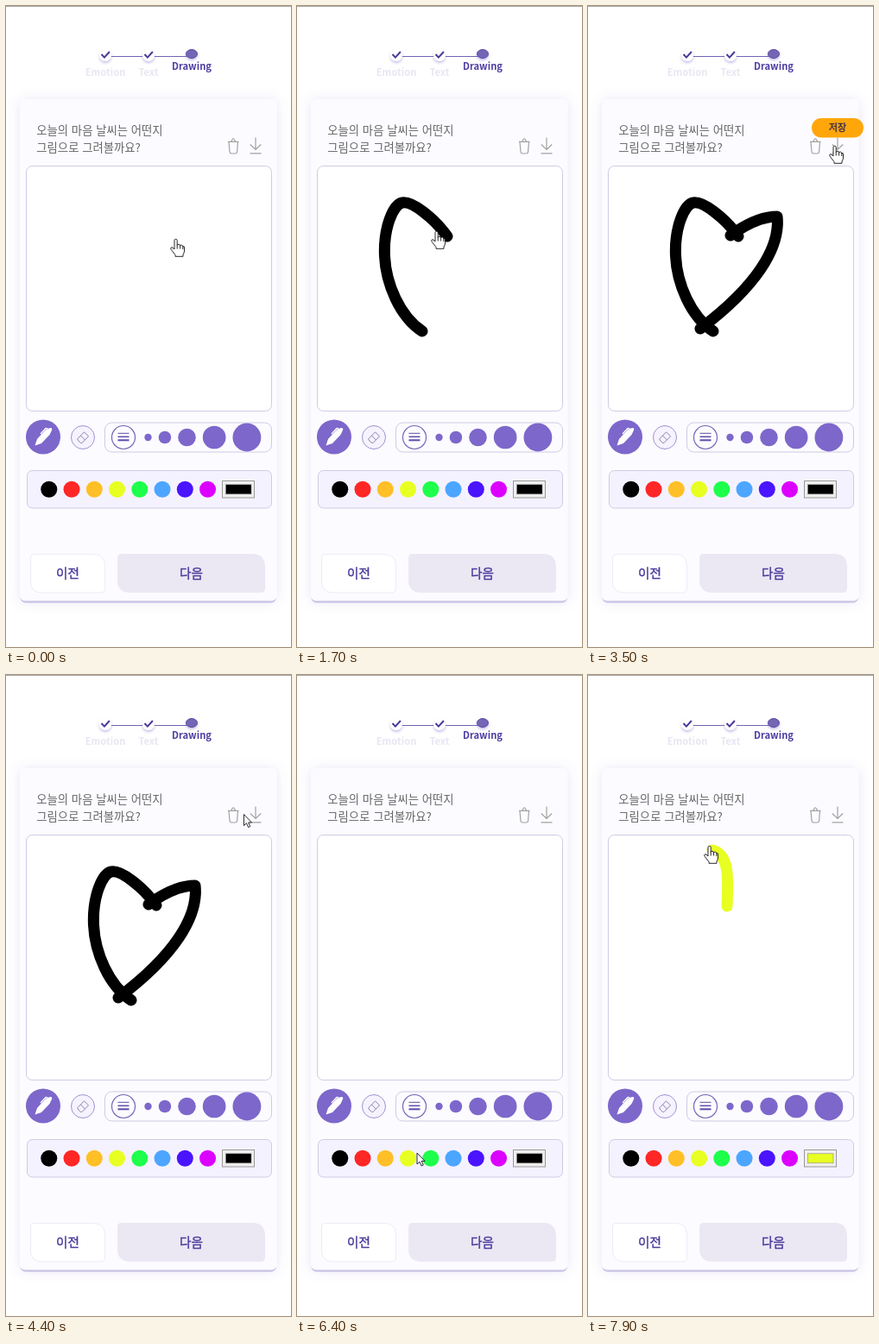
Write an HTML page that moves like this. It is 330x743 px and loops after 8000 ms.

```html
<!DOCTYPE html>
<html lang="ko">
<head>
<meta charset="utf-8">
<title>Drawing</title>
<style>
  html, body { margin: 0; width: 100%; height: 100%; overflow: hidden; background: #fff; }
  svg { display: block; width: 100vw; height: 100vh; }
  text { font-family: "Noto Sans CJK KR", "Noto Sans CJK JP", "Noto Sans CJK", "Noto Sans", sans-serif; }
  .step { font-size: 11.2px; font-weight: 700; text-anchor: middle; fill: #e9e6f3; }
  .ask { font-size: 13.35px; fill: #666; }
  .btn { font-size: 14.6px; text-anchor: middle; fill: #4c3b9b; stroke: #4c3b9b; stroke-width: .4; }
  .tip rect { fill: #ffa60a; }
  .tip text { font-size: 11px; text-anchor: middle; fill: #35264f; stroke: #35264f; stroke-width: .3; }
  .box { stroke: #cfcbe3; fill: #fcfbff; }
  .icon { fill: none; stroke: #a2a2a2; stroke-width: 1.2; }
  .ink { fill: none; stroke-width: 13; stroke-linecap: round; stroke-linejoin: round; }
  .cursor { fill: #fff; stroke: #111; stroke-width: .9; stroke-linejoin: round; }
</style>
</head>
<body>
<svg viewBox="0 0 330 743">
  <defs>
    <filter id="glow" x="-20%" y="-20%" width="140%" height="140%">
      <feDropShadow dx="0" dy="1" stdDeviation="7" flood-color="#7460c8" flood-opacity=".17"/>
    </filter>
    <filter id="soft" x="-60%" y="-60%" width="220%" height="220%">
      <feDropShadow dx="0" dy="2" stdDeviation="1.7" flood-color="#7460c8" flood-opacity=".4"/>
    </filter>
  </defs>
  <rect width="330" height="743" fill="#fff"/>
  <rect width="330" height="1" fill="#a9a9a9"/>

  <path d="M115 58.5H215" stroke="#7263b5" stroke-width="1.2"/>
  <g filter="url(#soft)" fill="#fff">
    <circle cx="115" cy="57" r="7"/>
    <circle cx="165" cy="57" r="7"/>
    <ellipse cx="215" cy="55.5" rx="6.5" ry="5" fill="#7566b5" stroke="#5747a0"/>
  </g>
  <path d="M110.500 56l3.400 3.600 6-6.600M160.500 56l3.400 3.600 6-6.600" fill="none" stroke="#4b3798" stroke-width="2"/>
  <text class="step" x="115" y="81">Emotion</text>
  <text class="step" x="165" y="81">Text</text>
  <text class="step" x="215" y="73.700" style="fill:#4f3da3">Drawing</text>

  <rect x="16.500" y="111" width="296.500" height="580.700" rx="6" fill="#cfcae6"/>
  <rect x="16" y="108" width="297.500" height="581.500" rx="6" fill="#fcfbff" filter="url(#glow)"/>
  <text class="ask" x="35.300" y="149.300">오늘의 마음 날씨는 어떤지</text>
  <text class="ask" x="35.300" y="168.800">그림으로 그려볼까요?</text>
  <path class="icon" d="M257 157.300H269.500M261 157Q263.200 150.500 265.500 157M258 157.500L259 169Q259.300 171 261 171H265.500Q267.300 171 267.600 169L268.500 157.500"/>
  <path class="icon" d="M289 152.500V166M282.800 160.500L289 166.500L295.200 160.500M282.500 170.800H295.500"/>

  <rect class="box" x="23.500" y="185.500" width="284" height="284" rx="7" style="fill:#fff"/>

  <circle cx="43" cy="499.500" r="20" fill="#7d67cb"/>
  <path d="M33.500 509.500L36 502L45.500 491.500L51 489Q54 488.500 53 491.800L50.500 497L41 507Z" fill="#fff"/>
  <path d="M40 496L46 489.500L48.500 490" fill="none" stroke="#fff" stroke-width="1.300"/>
  <circle cx="89" cy="500" r="13.500" fill="#f6f3ff" stroke="#a093d2"/>
  <path d="M83 501.500L90.500 493.800L95.500 498.800L88 506.500H86.500L83 503ZM86.500 498L91.500 503" fill="none" stroke="#8c82ac"/>
  <rect class="box" x="114.500" y="483" width="193" height="34" rx="8"/>
  <circle cx="136" cy="500" r="13.500" fill="#fcfbff" stroke="#7665b8" stroke-width="1.200"/>
  <g id="lines" stroke="#5e4ea8"></g>
  <rect class="box" x="24.500" y="538.500" width="283" height="43.500" rx="6" style="fill:#f5f2ff"/>
  <g id="dots"></g>
  <rect x="250.500" y="550.500" width="37" height="19.500" fill="#f0efee" stroke="#999"/>
  <rect id="swatch" x="254.500" y="554.800" width="29.500" height="11" stroke="#888" stroke-width=".6"/>

  <path d="M33 635.500H101Q114.500 635.500 114.500 649V675Q114.500 680 110 680H42Q28.500 680 28.500 667V640Q28.500 635.500 33 635.500Z" fill="#fff" stroke="#eeebf7"/>
  <path d="M134 635H285Q300 635 300 650V675Q300 680 295 680H144Q129 680 129 665V640Q129 635 134 635Z" fill="#ebe8f4"/>
  <text class="btn" x="71.500" y="663">이전</text>
  <text class="btn" x="214.500" y="663">다음</text>

  <g id="inks"></g>

  <g class="tip" id="saveTip">
    <rect x="259" y="130" width="60" height="22.500" rx="11.200"/>
    <text x="289" y="145.300">저장</text>
  </g>
  <g class="tip" id="resetTip">
    <rect x="233" y="130" width="60" height="22.500" rx="11.200"/>
    <text x="263.500" y="145.300">초기화</text>
  </g>

  <path class="cursor" id="arrow" d="M0 0V13L3 10.200L5.200 15L7.300 14L5.200 9.400H9Z"/>
  <path class="cursor" id="hand" d="M-1 12V1.700Q-1 .3 .6 .3T2.200 1.700V7.200Q2.400 6 4 6.200T5.600 8Q6 6.800 7.400 7.100T8.800 9Q10.500 7.500 10.500 10V14Q10.500 16 9 18V20.300H0V18.500L-4.700 12.500Q-6 10.600 -4.600 9.800T-1 12ZM2.200 7V11.500M5.600 8V11.500M8.800 9V12"/>
</svg>
<script>
const LOOP = 8000, STEP = 100;
const CLEAR = 5500, PICK = 6800;
const YELLOW = '#e8ff22';
const $ = id => document.getElementById(id);

function add(parent, tag, attrs) {
  const el = document.createElementNS('http://www.w3.org/2000/svg', tag);
  for (const key in attrs) el.setAttribute(key, attrs[key]);
  return parent.appendChild(el);
}

for (let i = 0; i < 3; i++) {
  add($('lines'), 'path', { d: `M129.500 ${495.3 + i * 4}h13`, 'stroke-width': 1 + i * .5 });
}

// Brush sizes grow evenly with equal gaps; colours share one size
const dots = [];
for (let i = 0, x = 164.5; i < 5; i++) {
  const r = 4.2 + i * 3.05;
  dots.push({ x, y: 500, r, fill: '#7d67cb' });
  x += 2 * r + 3.05 + 8;
}
['#000', '#ff2626', '#ffbf26', YELLOW, '#1eff4c', '#4ca6ff', '#4a14ff', '#dc00ff']
  .forEach((fill, i) => dots.push({ x: 49.8 + i * 26.25, y: 560.2, r: 9.5, fill }));
dots.forEach(d => add($('dots'), 'circle', { cx: d.x, cy: d.y, r: d.r, fill: d.fill }));

// The pointer rides a little up and left of the ink
const grip = p => ({ x: p.x - 4, y: p.y - 5 });

function stroke(start, end, color, d) {
  const el = add($('inks'), 'path', { class: 'ink', stroke: color, d });
  const len = el.getTotalLength();
  return { start, end, el, len, at: u => grip(el.getPointAtLength(len * u)) };
}

const strokes = [
  stroke(700, 1500, '#000', 'M174 267C158 245 133 226 122 228S100 258 101.500 290S119 360 145 377'),
  stroke(1700, 2300, '#000', 'M165 266C180 255 199 244 219 244C223 280 195 325 130 374'),
  stroke(7600, 7900, YELLOW, 'M161 268C162 240 165 208 144 203')
];
const [left, right, ray] = strokes;

// Each glide leaves from wherever the pointer last rested
const glide = (start, end, to) => ({ start, end, to });
const moves = [
  glide(0, 500, left.at(0)), left,
  glide(1500, 1700, right.at(0)), right,
  glide(2300, 2600, { x: 154, y: 363 }),
  glide(2600, 3100, { x: 279, y: 164 }),
  glide(3300, 3600, { x: 288, y: 161 }),
  glide(4200, 4550, { x: 266, y: 162 }),
  glide(CLEAR, 6300, { x: 139, y: 554 }),
  glide(6400, 6600, { x: 126, y: 557 }),
  glide(PICK, 7600, ray.at(0)), ray
];
let rest = { x: 196, y: 270 };
for (const m of moves) {
  if (m.to) {
    const from = rest;
    m.at = u => ({ x: from.x + (m.to.x - from.x) * u, y: from.y + (m.to.y - from.y) * u });
  }
  rest = m.at(1);
}

const progress = (m, t) => Math.max(0, Math.min(1, (t - m.start) / (m.end - m.start)));
const show = (el, on) => el.setAttribute('visibility', on ? 'visible' : 'hidden');

function draw(t) {
  for (const s of strokes) {
    const p = progress(s, t);
    show(s.el, p > 0 && (s === ray || t < CLEAR));
    s.el.setAttribute('stroke-dasharray', `${p * s.len + .1} ${s.len * 2}`);
  }
  const move = moves.filter(m => m.start <= t).pop();
  const { x, y } = move.at(progress(move, t));
  const inside = (l, top, r, b) => x >= l && x <= r && y >= top && y <= b;
  const save = inside(282, 150, 297, 173);
  const reset = inside(256, 150, 270, 173);
  const hand = save || reset || inside(24, 186, 307, 469) ||
    dots.some(d => Math.hypot(x - d.x, y - d.y) < d.r);
  show($('saveTip'), save);
  show($('resetTip'), reset);
  show($('hand'), hand);
  show($('arrow'), !hand);
  $(hand ? 'hand' : 'arrow').setAttribute('transform', `translate(${x} ${y})`);
  $('swatch').setAttribute('fill', t >= PICK ? YELLOW : '#000');
}

function tick() {
  const t = performance.now() % LOOP;
  draw(Math.floor(t / STEP) * STEP);
  requestAnimationFrame(tick);
}
tick();
</script>
</body>
</html>
```
